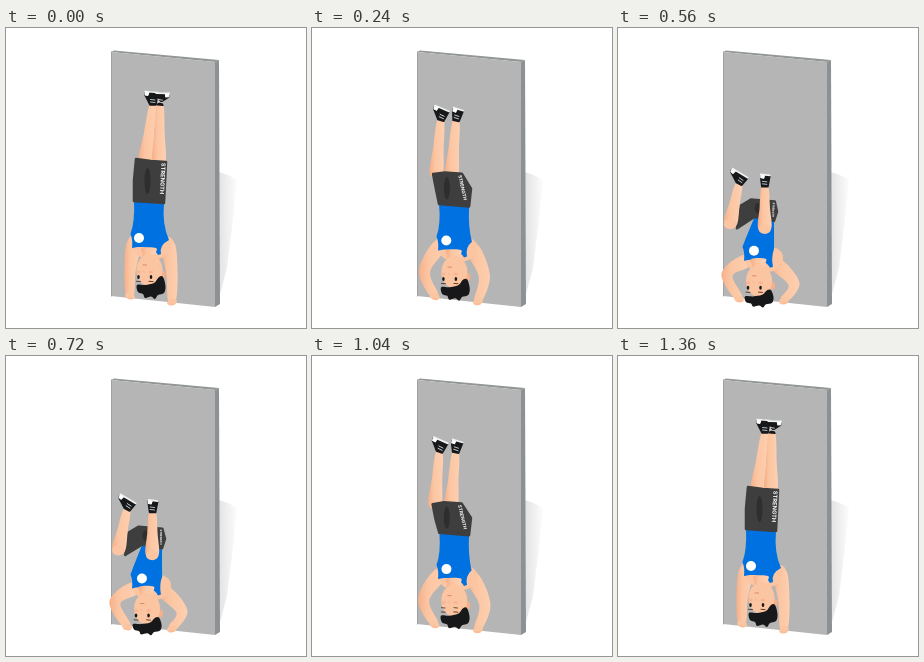
These frames come from a looping animation (300 px wide and 300 px high, 1840 ms). An HTML page with a canvas:

```html
<!DOCTYPE html>
<html lang="en">
<head>
<meta charset="utf-8">
<title>Handstand push-up</title>
<style>
  html, body { margin: 0; width: 100%; height: 100%; overflow: hidden; background: #fff; }
  canvas { display: block; width: 300px; height: 300px; }
</style>
</head>
<body>
<canvas id="stage"></canvas>
<script>
const LOOP = 1840, STEP = 40;
const SKIN = '#fcc5a1', SHADE = '#f5b08b', BLUE = '#0071e0', CLOTH = '#3f3e3e', INK = '#17181a';

const canvas = document.getElementById('stage');
const ratio = window.devicePixelRatio || 1;
canvas.width = canvas.height = 300 * ratio;
const c = canvas.getContext('2d');

const clamp = x => Math.min(1, Math.max(0, x));
const mix = (a, b, u) => a + (b - a) * u;
const ease = x => {
  x = clamp(x);
  return x < .5 ? 4 * x ** 3 : 1 - 4 * (1 - x) ** 3;
};

// Depth goes 0 (straight) to 1 (lowest); joints fold faster than the body sinks.
const depthAt = t => clamp(ease(t / 660) - ease((t - 540) / 820));
let depth = 0, fold = 0;

// A value between its straight and lowest state, bowed by sway on the way.
const bend = (a, b, sway = 0) => mix(a, b, fold) + sway * 4 * fold * (1 - fold);
const move = (a, b, sx = 0, sy = 0) =>
  [bend(a[0], b[0], sx), mix(a[1], b[1], depth) + sy * 4 * fold * (1 - fold)];

function poly(pts, fill, soft = 0) {
  c.beginPath();
  pts.forEach(q => c.lineTo(...q));
  c.closePath();
  c.fillStyle = fill;
  c.fill();
  if (soft) {
    c.lineJoin = 'round';
    c.lineWidth = soft;
    c.strokeStyle = fill;
    c.stroke();
  }
}

function blob(pts, fill) {
  const n = pts.length, q = i => pts[(i + n) % n];
  c.beginPath();
  c.moveTo(...pts[0]);
  for (let i = 0; i < n; i++) {
    const [a, b, d, e] = [q(i - 1), q(i), q(i + 1), q(i + 2)];
    c.bezierCurveTo(b[0] + (d[0] - a[0]) / 6, b[1] + (d[1] - a[1]) / 6,
      d[0] - (e[0] - b[0]) / 6, d[1] - (e[1] - b[1]) / 6, ...d);
  }
  c.fillStyle = fill;
  c.fill();
}

function oval(x, y, rx, ry, fill, turn = 0) {
  c.beginPath();
  c.ellipse(x, y, rx, ry, turn, 0, 7);
  c.fillStyle = fill;
  c.fill();
}

function line(a, b, color, width) {
  c.beginPath();
  c.moveTo(...a);
  c.lineTo(...b);
  c.strokeStyle = color;
  c.lineWidth = width;
  c.lineCap = 'round';
  c.stroke();
}

// Tapered tube through three joints, with half widths.
function limb(joints, widths) {
  const left = [], right = [];
  joints.forEach(([x, y], i) => {
    const a = joints[Math.max(0, i - 1)], b = joints[Math.min(2, i + 1)];
    const dx = b[0] - a[0], dy = b[1] - a[1], k = widths[i] / Math.hypot(dx, dy);
    left.push([x - dy * k, y + dx * k]);
    right.unshift([x + dy * k, y - dx * k]);
  });
  const xs = [...left, ...right].map(q => q[0]);
  const g = c.createLinearGradient(Math.min(...xs), 0, Math.max(...xs), 0);
  g.addColorStop(0, SHADE);
  g.addColorStop(.35, SKIN);
  g.addColorStop(1, '#fdcfb0');
  blob([...left, ...right], g);
}

function wall() {
  const g = c.createLinearGradient(212, 0, 231, 0);
  g.addColorStop(0, '#e2e2e2');
  g.addColorStop(1, '#fcfcfc');
  poly([[213, 144], [222, 147], [231, 152], [226, 200], [221, 240], [214, 266]], g);
  poly([[105, 24], [108, 22.5], [213, 32], [209, 34]], '#939697');
  poly([[209, 34], [213, 32], [214, 276], [209, 279]], '#8e9193');
  poly([[105, 24], [209, 34], [209, 279], [105, 268]], '#b5b5b5');
  line([105.5, 24], [105.5, 268], '#a0a0a0', 1);
}

function shoe([x, y], toe, tilt, height) {
  const side = Math.sign(toe) || 1, heel = -side * 5;
  c.save();
  c.translate(x, y);
  c.rotate(tilt);
  poly([[-3, 0], [3, 0], [heel, -height + 1], [toe, -height], [toe, -height + 3]], INK, 1.5);
  poly([[toe, -height], [toe, -height + 3], [toe - side * 3, -height + 3.5], [toe - side * 4, -height]], '#fff', 1);
  line([toe, -height - .5], [heel, -height + .5], '#f1f3f4', 1.7);
  for (const k of [2.5, 5]) line([-2.5, -k - .5], [2, -k], '#dce5e8', .8);
  c.restore();
}

function leg(ankle, knee, ...shoeShape) {
  const mid = ankle.map((v, k) => (v + knee[k]) / 2);
  limb([ankle, mid, knee], [3.4, 5.2, 6.3]);
  if (depth > .5) oval(...knee, 6.2, 5, SKIN);
  shoe(ankle, ...shoeShape);
}

function legs() {
  leg(move([147, 77], [121, 157], -7), move([139, 135], [112, 197], -3),
    bend(-8, -13), bend(0, .48, .12), bend(13, 10));
  leg(move([154, 77], [147, 160], -7), move([153, 135], [147, 202], -11),
    bend(8, -4, -8), bend(.1, 0, .15), 12);
}

function arm(shoulder, elbow, hand, turn) {
  const [x, y] = hand;
  oval(...shoulder, 6, 7, SKIN);
  limb([shoulder, elbow, hand], [6.6, 5.6, 3.8]);
  oval(x, y + 1, 5, 3.4, SKIN, turn);
  line([x - 2, y + 3], [x + 2, y + 3.4], SHADE, .7);
}

function arms() {
  arm(move([128, 214], [126, 234]), move([124, 243], [109, 247], -5), move([124, 267], [121, 270]), .3);
  arm(move([162, 216], [158, 236]), move([166, 246], [176, 256], 2), move([166, 273], [166, 272]), -.3);
}

const shortsPose = () => ({
  hemA: move([130, 131], [123, 178], -6, 6),
  hemB: move([145, 133], [133, 172], -7, 4),
  hemD: move([160, 134], [157, 174], -9, 4),
  hipR: move([159, 155], [159, 184]),
  waistR: move([158, 175], [156, 193]),
  waistL: move([128, 173], [137, 189], -5),
  hipL: move([128, 152], [119, 201])
});

function shorts(s) {
  poly(Object.values(s), CLOTH, 2.5);
  const x = (s.hemB[0] + s.waistL[0]) / 2 + 5, y = (s.hemB[1] + s.waistL[1]) / 2;
  oval(x, y, 3, mix(13, 5, depth), '#2f2e2e');

  const [ax, ay] = s.hemD, dx = s.waistR[0] - ax, dy = s.waistR[1] - ay;
  c.save();
  c.translate(ax, ay + 1);
  c.rotate(Math.atan2(dy, dx));
  c.font = `bold ${Math.hypot(dx, dy) * .14}px Inter, sans-serif`;
  c.textBaseline = 'top';
  c.fillStyle = '#fff';
  c.fillText('STRENGTH', 0, 0);
  c.restore();
}

function torso({ waistL, waistR }) {
  const d = depth * 13, edge = move([163, 212], [156, 221]);
  blob([[127, 210 + d], [143, 203 + d], [162, 210 + d], [164, 222 + d], [152, 231 + d], [131, 227 + d]], SKIN);
  c.beginPath();
  c.moveTo(...waistL);
  c.quadraticCurveTo(129, 194 + d, 124.5, 206 + d);
  c.quadraticCurveTo(127, 212 + d, 126, 220 + d);
  c.bezierCurveTo(133, 218 + d, 148, 218 + d, 152, 227 + d);
  c.lineTo(155, 226 + d);
  c.quadraticCurveTo(153, 217 + d, ...edge);
  c.quadraticCurveTo(156, 197 + d, ...waistR);
  c.closePath();
  c.fillStyle = BLUE;
  c.fill();
  oval(bend(133, 136), 210 + d, 5, 5, '#fff');
}

function head(blink) {
  c.save();
  c.translate(bend(0, -2.5), depth * 11);
  limb([[143, 220], [143, 226], [143, 233]], [7, 6.5, 6.5]);
  oval(157, 247, 2.5, 4, SHADE);
  oval(143.5, 242, 13, 16, SKIN);
  for (const x of [132.5, 145]) {
    if (blink) line([x - 1.8, 249], [x + 1.8, 249.4], '#50301f', .8);
    else oval(x, 249, 1.3, 2, INK);
    line([x - 2, 253.3], [x + 2, 253.6], '#50301f', .9);
    oval(x, 244, 2.4, 1.5, '#f9b495');
  }
  line([138.5, 244.5], [137.5, 243], SHADE, 1);
  line([137, 237], [140.5, 237], '#d0785f', .8);
  c.restore();

  // The hair flattens against the floor.
  c.save();
  c.translate(bend(0, -4), 271 + depth * 8.5);
  c.scale(1, mix(1, .78, depth));
  blob([[131, -14], [139, -14], [148, -16], [153, -22], [157, -22], [159.5, -13], [158, -6],
    [152, -4], [149, 0], [145, -2.5], [139, -1], [137, -5], [132, -7]], INK);
  c.restore();
}

function draw(t) {
  depth = depthAt(t);
  fold = Math.sqrt(depth);
  const s = shortsPose();

  c.setTransform(ratio, 0, 0, ratio, 0, 0);
  c.fillStyle = '#fff';
  c.fillRect(0, 0, 300, 300);
  wall();
  if (depth <= .5) legs();
  arms();
  torso(s);
  shorts(s);
  if (depth > .5) legs();
  head(t >= 960 && t < 1120);
}

const start = performance.now();
function frame() {
  const t = (performance.now() - start) % LOOP;
  draw(Math.floor(t / STEP) * STEP);
  requestAnimationFrame(frame);
}
frame();
</script>
</body>
</html>
```
